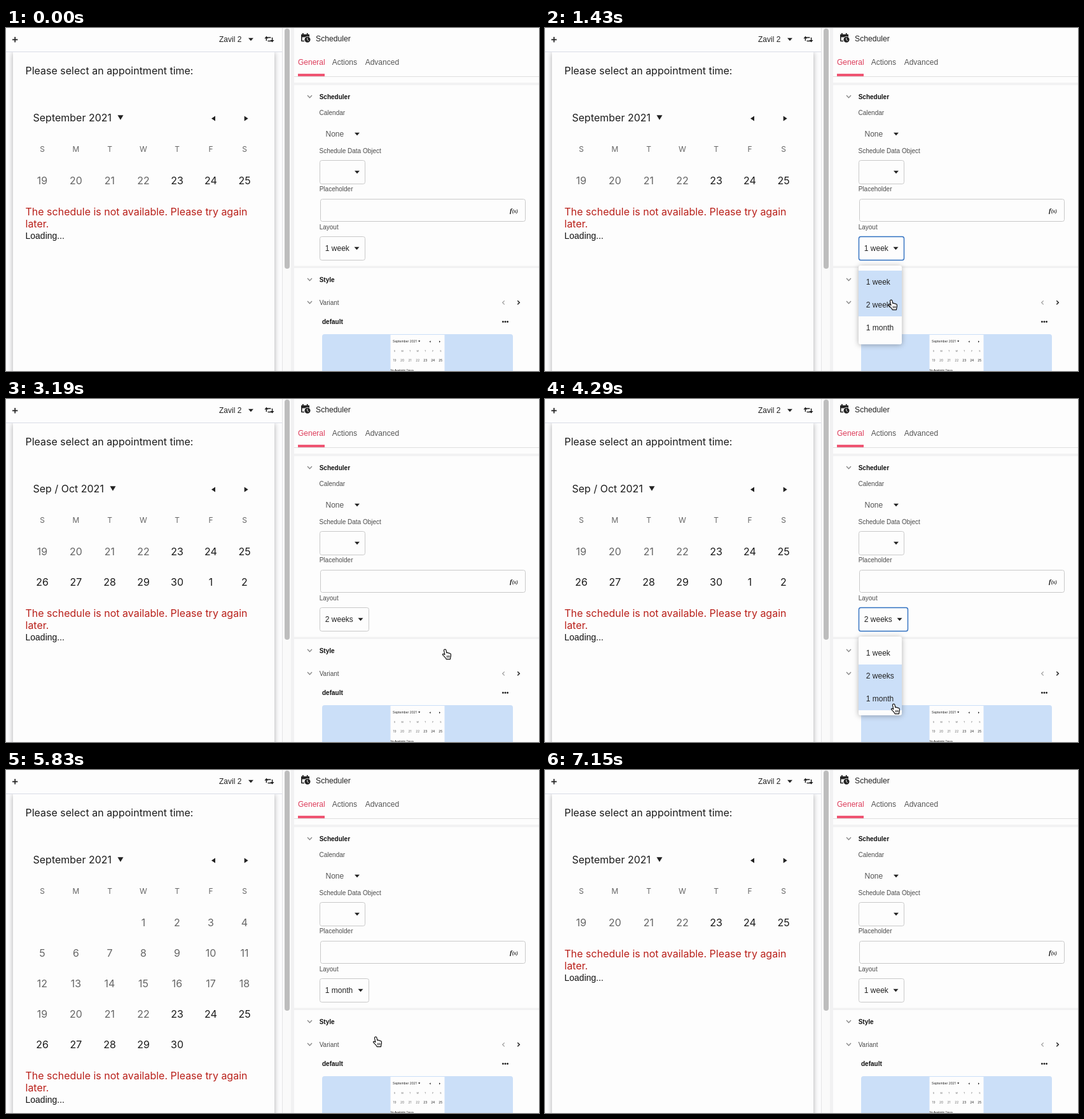
Animation of 838x540 px, one loop 7.26 s. Source, as an HTML page:

```html
<!DOCTYPE html>
<html lang="en">
<head>
<meta charset="utf-8">
<title>Scheduler layout</title>
<style>
html, body { margin: 0; width: 100%; height: 100%; overflow: hidden; background: #fdfdfd; }
svg { display: block; }
text { font-family: "Liberation Sans", Arial, sans-serif; font-size: 12px; fill: #222; white-space: pre; }
.app { font-family: Inter, sans-serif; font-size: 16px; fill: #1c1c1c; }
.day { text-anchor: middle; }
.off { fill: #666; }
.label { font-size: 10px; fill: #4c4c4c; }
.head { font-size: 10px; font-weight: 700; fill: #111; }
.error { fill: #b9201a; }
.box { fill: #fdfdfd; stroke: #c9c9c9; }
.line { fill: none; stroke: #222; stroke-width: 1.5; }
.shade { filter: drop-shadow(0 1px 4px rgba(0,0,0,.3)); }
</style>
</head>
<body>
<svg id="stage" width="838" height="540" viewBox="0 0 838 540"></svg>
<script>
const LOOP = 7260, STEP = 110;
const stage = document.getElementById('stage');

const text = (x, y, s, cls = '', extra = '') => `<text x="${x}" y="${y}" class="${cls}" ${extra}>${s}</text>`;
const rect = (x, y, w, h, fill, extra = '') => `<rect x="${x}" y="${y}" width="${w}" height="${h}" fill="${fill}" ${extra}/>`;
const path = (d, extra = '') => `<path d="${d}" ${extra}/>`;
const down = (x, y, w = 8, h = 4.5) => path(`M${x - w / 2} ${y - h / 2}h${w}l${-w / 2} ${h}z`, 'fill="#222"');
const chevron = (x, y) => path(`M${x - 3.5} ${y - 2}l3.5 3.7l3.5 -3.7`, 'class="line" style="stroke:#888;stroke-width:1.3"');
const field = (x, y, w, h, extra = '') => `<rect x="${x + .5}" y="${y + .5}" width="${w - 1}" height="${h - 1}" rx="3" class="box" ${extra}/>`;
const group = id => `<g id="${id}"></g>`;
const weekdays = [...'SMTWTFS'];

function phone() {
  return rect(0, 0, 435, 540, '#fcfcfd')
    + rect(11, 38, 411, 520, '#fdfdfd', 'style="filter:drop-shadow(0 1px 4px rgba(0,0,0,.32))"')
    + rect(0, 0, 434, 37, '#fdfdfd') + rect(0, 37, 434, 1, '#d9dce6')
    + path('M10 18.3h8.4M14.2 14.1v8.4', 'class="line" style="stroke-width:1.7"')
    + text(335, 22, 'Zavil 2') + down(385, 18)
    + path('M409.4 20v-5h7M418.6 15v5.4h-7', 'class="line"')
    + path('M406.4 16.4l3 -3.6l3 3.6zM415.6 19l3 3.6l3 -3.6z', 'fill="#222"')
    + text(30.5, 73, 'Please select an appointment time:', 'app')
    + path('M329 138.5v8l-6 -4zM374.7 138.5v8l6 -4z', 'fill="#222"')
    + weekdays.map((d, i) => text(57 + 53 * i, 195, d, 'app day off', 'style="font-size:12px"')).join('');
}

function preview() {
  const small = 'style="font-size:4.9px"';
  return rect(497, 482, 300, 70, '#cbdff8', 'rx="4"') + rect(604.5, 483, 85, 57, '#fdfdfd')
    + text(608, 495.3, 'September 2021', 'app', small) + down(649.7, 493.3, 3, 2.4)
    + path('M667.6 492.2v3l-2 -1.5zM681 492.2v3l2 -1.5z', 'fill="#222"')
    + weekdays.map((d, i) => {
        const x = 611 + 12.05 * i;
        return text(x, 510, d, 'app day off', 'style="font-size:3.6px"')
          + text(x, 525.2, 19 + i, 'app day' + (i < 4 ? ' off' : ''), small);
      }).join('')
    + text(604.5, 539.6, 'No Available Times', '', 'style="font-size:4.3px"');
}

function calendarIcon() {
  return path('M465 10h11a1 1 0 0 1 1 1v3.5h-1.6v-1h-9.8v6.2h3.6v1.5H465a1 1 0 0 1 -1 -1V11a1 1 0 0 1 1 -1zM466 8h1.8v3H466zM472.8 8h1.8v3h-1.8z', 'fill="#222"')
    + rect(464, 10.5, 13, 4, '#222')
    + '<circle cx="474" cy="18.3" r="5.3" fill="#fdfdfd"/><circle cx="474" cy="18.3" r="4.5" fill="#222"/>'
    + path('M473.8 15.5v3l2 1.5', 'class="line" style="stroke:#fff;stroke-width:1"');
}

function panel() {
  return rect(434, 0, 1, 540, '#e4e4e6') + rect(435, 0, 13, 540, '#fafafa')
    + rect(448, 0, 5, 540, '#f1f1f2') + rect(438, 1, 8, 378, '#bdbdbd', 'rx="4"')
    + rect(453, 0, 385, 540, '#fdfdfd') + calendarIcon()
    + text(487, 21, 'Scheduler', '', 'style="font-size:12.2px"')
    + text(459, 58, 'General', '', 'style="fill:#dd3c5a"')
    + text(512.7, 58, 'Actions', '', 'style="fill:#555"')
    + text(564.7, 58, 'Advanced', '', 'style="fill:#555"')
    + rect(453, 76, 385, 1, '#dedede') + rect(459, 72, 42, 4, '#ef5472')
    + rect(453, 86, 385, 4, '#f2f2f3') + rect(453, 374.5, 385, 3.5, '#f1f1f2')
    + chevron(477.5, 108) + text(492.7, 112, 'Scheduler', 'head')
    + text(492.5, 137, 'Calendar', 'label')
    + text(502.5, 171, 'None', '', 'style="fill:#555"') + down(552, 167)
    + text(492.5, 197, 'Schedule Data Object', 'label')
    + field(493, 208, 72, 38) + down(552, 227)
    + text(492.7, 257, 'Placeholder', 'label')
    + field(494, 269, 323, 36)
    + text(792, 291, 'f<tspan style="font-size:8px">(x)</tspan>', '', 'style="font:italic 700 11px \'Liberation Serif\',serif"')
    + text(492.7, 317, 'Layout', 'label')
    + chevron(477.5, 396) + text(492.7, 400, 'Style', 'head')
    + chevron(477.5, 432) + text(492.7, 436, 'Variant', 'label')
    + path('M783.7 429.3l-3 3l3 3', 'class="line" style="stroke:#999;stroke-width:1.2"')
    + path('M804.3 429.3l3 3l-3 3', 'class="line"')
    + text(497, 466, 'default', 'head')
    + [781.4, 785, 788.6].map(x => `<circle cx="${x}" cy="462.5" r="1.4" fill="#222"/>`).join('')
    + preview();
}

const arrow = path('M0 0V14.2L3.3 11.2L5.4 16.2L7.8 15.2L5.7 10.3H10.2Z', 'fill="#000" stroke="#fff"');
const hand = '<g transform="translate(-4.3 -.8)">'
  + path('M4.6 .9c1 0 1.5.6 1.7 1.5l.8 4c.4-.7 2-.6 2.4.5.7-.6 1.9-.4 2.1.6.9-.4 2 .1 2.1 1.1.2 1.9.2 3.3-.5 4.8l-.5 3.1H6.6c-.6-1.7-2-2.8-3.2-4.3C2.5 10.9 1.2 10.2.8 9.3.6 8.2 1.8 7.7 2.8 8.3l1.4 1.1L2.8 2.9C2.6 1.8 3.5.9 4.6.9z',
      'fill="#fff" stroke="#111" stroke-width="1.2" stroke-linejoin="round"')
  + path('M7.5 10.6l.3 3.6M9.4 10.5l.2 3.6M11.3 10.4v3.6', 'class="line" style="stroke-width:.9"') + '</g>';

const layouts = [
  { name: '1 week', title: 'September 2021', arrowX: 180, first: 19, rows: 1, last: 25, width: 72 },
  { name: '2 weeks', title: 'Sep / Oct 2021', arrowX: 168, first: 19, rows: 2, last: 32, width: 78 },
  { name: '1 month', title: 'September 2021', arrowX: 180, first: -2, rows: 5, last: 30, width: 78 }
];

function calendar(l) {
  let out = text(42.5, 147, l.title, 'app') + down(l.arrowX, 141, 9, 7.5);
  for (let i = 0; i < l.rows * 7; i++) {
    const day = l.first + i;
    if (day < 1 || day > l.last) continue;
    out += text(57 + 53 * (i % 7), 246 + 48 * Math.floor(i / 7), day > 30 ? day - 30 : day, 'app day' + (day < 23 ? ' off' : ''));
  }
  const y = 48 * (l.rows - 1);
  return out + text(30.5, 295 + y, 'The schedule is not available. Please try again', 'app error')
    + text(30.5, 314 + y, 'later.', 'app error')
    + text(30.5, 332 + y, 'Loading...', '', 'style="font-size:14px;fill:#111"');
}

const select = (l, open) =>
  field(493, 328, l.width, 38, open ? 'style="stroke:#2f6fc0;stroke-width:1.4"' : '')
  + text(501.8, 351, l.name) + down(493 + l.width - 13.5, 347);

function menu(chosen, hover) {
  return rect(493, 374, 68, 124, '#fdfdfd', 'rx="3" class="shade"')
    + layouts.map((l, i) => (i === chosen || i === hover ? rect(493, 382 + 36 * i, 68, 36, '#cbdff8') : '')
        + text(504.8, 404 + 36 * i, l.name)).join('');
}

// time, x, y of the pointer tip
const moves = [
  [110, 640, 560], [330, 612, 478], [550, 572, 392], [770, 554, 350], [990, 554, 350],
  [1210, 550, 388], [1430, 544, 428], [1870, 543, 430], [2090, 630, 412], [2310, 690, 394],
  [3190, 690, 394], [3410, 625, 378], [3630, 560, 352], [3850, 556, 350],
  [4070, 550, 425], [4290, 548, 480], [4510, 548, 478], [4730, 650, 448], [4950, 722, 432],
  [5390, 722, 432], [5610, 655, 430], [5830, 581, 420], [6050, 556, 352], [6160, 555, 350],
  [6380, 546, 398], [6490, 545, 400], [6710, 580, 452], [6930, 622, 560]
];
const choices = [[0, 0], [1760, 1], [4620, 2], [6600, 0]];
const openings = [[990, 1760], [3850, 4620], [6160, 6600]];

function pointer(t) {
  const n = moves.findIndex(m => m[0] > t);
  if (n < 1) return null;
  const [t0, x0, y0] = moves[n - 1], [t1, x1, y1] = moves[n];
  const k = (t - t0) / (t1 - t0);
  return { x: x0 + (x1 - x0) * k, y: y0 + (y1 - y0) * k };
}

stage.innerHTML = phone() + group('calendar') + panel() + group('select') + group('menu') + group('cursor');

const drawn = {};
function put(id, html) {
  if (drawn[id] === html) return;
  drawn[id] = html;
  document.getElementById(id).innerHTML = html;
}

function draw(t) {
  const chosen = choices.filter(c => c[0] <= t).pop()[1];
  const open = openings.some(([a, b]) => t >= a && t < b);
  const p = pointer(t);
  const hover = p ? Math.floor((p.y - 382) / 36) : -1;
  put('calendar', calendar(layouts[chosen]));
  put('select', select(layouts[chosen], open));
  put('menu', open ? menu(chosen, hover) : '');
  put('cursor', p ? `<g transform="translate(${p.x} ${p.y})">${p.y > 376 ? hand : arrow}</g>` : '');
}

function tick() {
  draw(Math.floor(performance.now() % LOOP / STEP) * STEP);
  requestAnimationFrame(tick);
}
tick();
</script>
</body>
</html>
```
